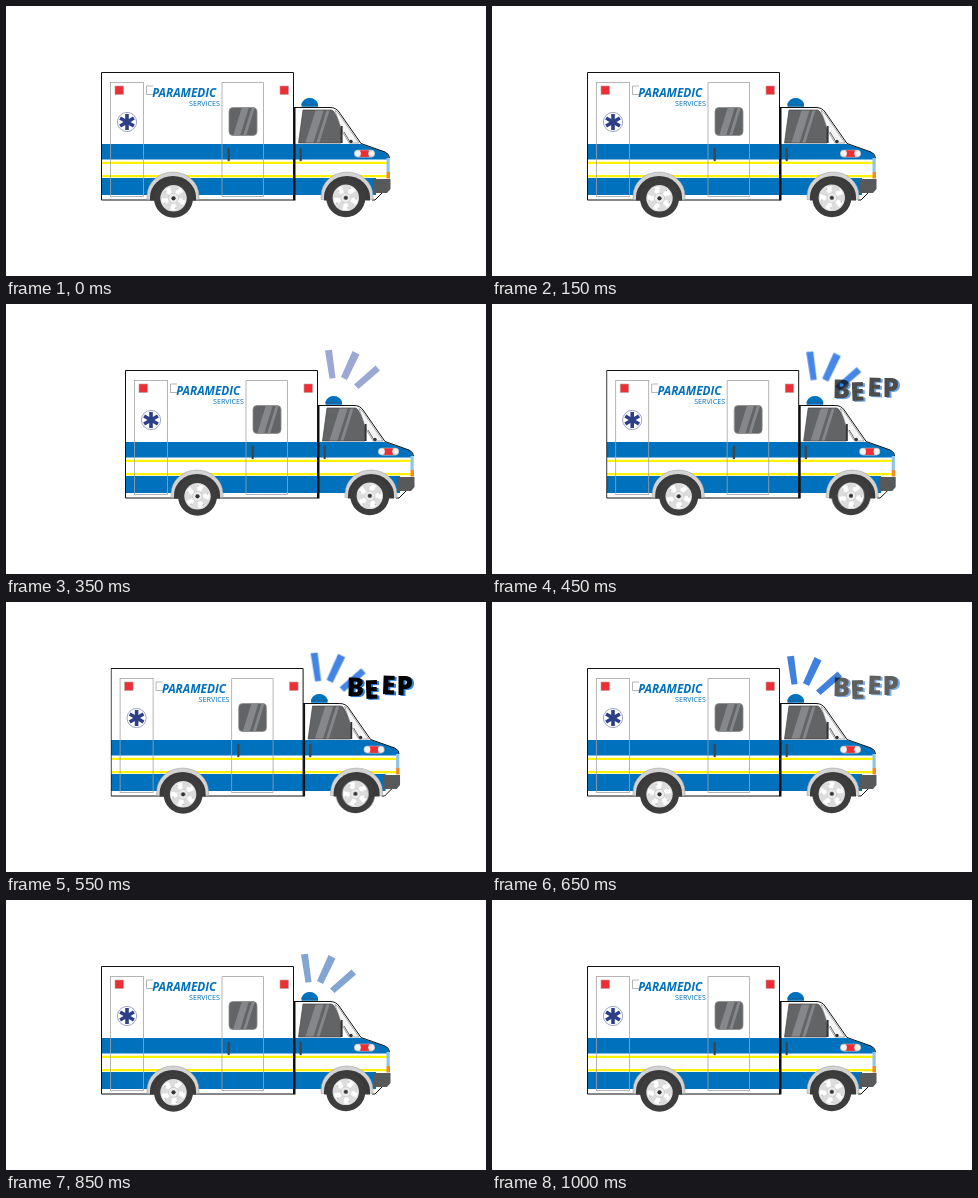
An HTML page that plays this animation: 480x270 px, repeating every 1050 ms.

```html
<!DOCTYPE html>
<html lang="en">
<head>
<meta charset="utf-8">
<title>Ambulance</title>
<style>
  html, body { margin: 0; width: 100%; height: 100%; overflow: hidden; background: #fff; }
  svg { display: block; width: 100%; height: 100%; }
  text { font-family: "Open Sans", sans-serif; }
  .blue { fill: #0071bc; }
  .yellow { fill: #fff200; }
  .red { fill: #ed2f35; }
  .line { fill: none; stroke: #a3a3a3; stroke-width: .8; }
  .ink { fill: none; stroke: #111; stroke-width: 1; stroke-linejoin: round; }
  .beep { font-size: 26px; font-weight: 800; }

  .van, .beams, .beep-group, .rim { animation: 1050ms linear infinite; }
  .van { animation-name: drive; }
  .beams { animation-name: rise, flash; animation-duration: 1050ms, 1050ms; animation-timing-function: linear; }
  .beep-group { animation-name: honk; animation-timing-function: step-end; }
  .rim { animation-name: roll; animation-timing-function: steps(21); }

  /* One step lasts 50 ms: 4.7619% of the loop. */
  @keyframes drive {
    0% { transform: translateX(0); }
    23.809% { transform: translateX(0); animation-timing-function: steps(2); }
    33.333% { transform: translateX(24px); }
    38.095% { transform: translateX(24px); animation-timing-function: steps(5); }
    61.904%, 100% { transform: translateX(0); }
  }
  @keyframes rise {
    0% { transform: translateY(0); }
    23.809% { transform: translateY(0); animation-timing-function: steps(2); }
    33.333% { transform: translateY(-8px); }
    38.095% { transform: translateY(-8px); animation-timing-function: steps(5); }
    61.904%, 100% { transform: translateY(0); }
  }
  @keyframes flash {
    0% { fill: #fff; }
    23.809% { fill: #fff; animation-timing-function: steps(2); }
    33.333% { fill: #9ba8d3; animation-timing-function: steps(2); }
    42.857% { fill: #4586e8; animation-timing-function: steps(5); }
    66.666% { fill: #3f80dd; animation-timing-function: steps(3); }
    80.952% { fill: #82a5d2; animation-timing-function: steps(2); }
    90.476%, 100% { fill: #fff; }
  }
  @keyframes honk {
    0% { opacity: 0; }
    38.095% { opacity: .35; }
    42.857% { opacity: .7; }
    47.619% { opacity: 1; }
    61.904% { opacity: .62; }
    66.666% { opacity: .3; }
    71.428%, 100% { opacity: 0; }
  }
  @keyframes roll { to { transform: rotate(360deg); } }
</style>
</head>
<body>
<svg viewBox="0 0 480 270">
  <defs>
    <g id="arch">
      <path d="M-26 2.5V-1A26 24 0 0 1 26-1V2.5Z" fill="#d3d3d3" stroke="#999" stroke-width=".5"/>
      <path d="M-23 3.5V0A23 21 0 0 1 23 0V3.5Z" fill="#3a3a3a"/>
    </g>
    <g id="wheel">
      <circle r="19.5" fill="#3d3d3d"/>
      <circle r="13.2" fill="#dcdcdc"/>
      <g class="rim">
        <circle r="8.6" fill="none" stroke="#fff" stroke-width="7" stroke-dasharray="5.2 5.607"/>
        <circle r="10.4" fill="none" stroke="#aaa" stroke-width="1.4" stroke-dasharray="1.6 11.469"/>
      </g>
      <circle r="5" fill="#ededed" stroke="#bbb" stroke-width=".6"/>
      <circle r="2.1" fill="#333"/>
    </g>
    <path id="arm" d="M-1.8-8H1.8V8H-1.8Z"/>
    <path id="handle" d="M0 143V154" stroke="#444" stroke-width="2.4" stroke-linecap="round"/>
    <clipPath id="pane"><rect x="223" y="101.5" width="28" height="28" rx="4"/></clipPath>
    <clipPath id="cabPane"><path id="cabGlass" d="M297 104H325Q327 104 328 106L335 119V137H292.5Z"/></clipPath>
  </defs>

  <g class="van">
    <g class="beams" fill="#fff">
      <path d="M295 54.5 302 53.7 305.5 82 299.5 82.7Z"/>
      <path d="M322.5 55 329.5 58.5 317 84 311 81Z"/>
      <path d="M345.5 69.5 350 74.5 328.5 93 324 88.5Z"/>
    </g>

    <!-- box -->
    <rect x="95.5" y="66.5" width="192" height="127.5" fill="#fff"/>
    <!-- cab -->
    <path d="M288 101.5H324Q330 101.5 333 106L355 137.5 379 146Q383.5 148 383.5 152V173L368 194H288Z" fill="#fff"/>
    <path class="blue" d="M95.5 138H355L379 146Q383 148 383 153.5H95.5Z"/>
    <path class="yellow" d="M95.5 155.7H382V157.9H95.5ZM95.5 169H382V171.2H95.5Z"/>
    <path class="blue" d="M95.5 172H370V189H95.5Z"/>
    <path class="ink" d="M288 194H95.5V66.5H287.5V194"/>
    <path class="ink" d="M288 101.5H324Q330 101.5 333 106L355 137.5 379 146Q383.5 148 383.5 152M366 194H369L376 187"/>
    <path d="M288.5 101V194.5" stroke="#111" stroke-width="2"/>

    <!-- rear panel -->
    <rect class="line" x="104.5" y="76.5" width="33" height="114"/>
    <path class="line" d="M147 88.5H140.5V80H147"/>
    <path class="line" d="M216 190.5V76.5H257.5V190.5Z"/>
    <g stroke="#b9a0a0" stroke-width=".6">
      <rect class="red" x="109" y="80" width="8.5" height="8.5"/>
      <rect class="red" x="274" y="80" width="8.5" height="8.5"/>
    </g>
    <g transform="translate(121 116)" fill="#2c3f87">
      <circle r="9.6" fill="#fff" stroke="#8790b4" stroke-width=".8"/>
      <use href="#arm"/>
      <use href="#arm" transform="rotate(60)"/>
      <use href="#arm" transform="rotate(120)"/>
    </g>
    <text class="blue" x="146.3" y="91" font-size="11.8" font-weight="700" font-style="italic">PARAMEDIC</text>
    <text class="blue" x="183" y="99.7" font-size="7.15">SERVICES</text>

    <!-- windows -->
    <g clip-path="url(#pane)">
      <rect x="223" y="101" width="28" height="29" fill="#626466"/>
      <path d="M236 101H243L234 130H227ZM246 101H249L240 130H237Z" fill="#85878a"/>
    </g>
    <rect x="223" y="101.5" width="28" height="28" rx="4" fill="none" stroke="#8e8e8e" stroke-width=".8"/>
    <g clip-path="url(#cabPane)">
      <path d="M290 103H337V138H290Z" fill="#626466"/>
      <path d="M310 103H318L307 138H299ZM321 103H324L313 138H310Z" fill="#85878a"/>
    </g>
    <use href="#cabGlass" fill="none" stroke="#444" stroke-width=".7"/>
    <path d="M329 104.5Q331 105 333 108L353 137H343L336 125Z" fill="#f5f5f5" stroke="#777" stroke-width=".6"/>
    <path d="M335.7 120V137" stroke="#333" stroke-width="1.8"/>
    <path d="M338 126 344 136" stroke="#444" stroke-width=".8"/>
    <circle cx="345" cy="135.5" r="1.7" fill="#333"/>
    <use href="#handle" x="222.7"/>
    <use href="#handle" x="294.7"/>

    <!-- lights and bumper -->
    <rect x="348" y="143.8" width="21" height="7.6" rx="3.8" fill="#b9bcbe"/>
    <rect class="red" x="354.3" y="144.3" width="8.5" height="6.6"/>
    <circle cx="351.8" cy="147.6" r="3" fill="#f2f2f2"/>
    <circle cx="365.3" cy="147.6" r="3" fill="#f2f2f2"/>
    <rect x="380.5" y="152" width="3.2" height="14" fill="#8fc6e8"/>
    <rect x="380.5" y="166" width="3.5" height="6.5" fill="#f28c28"/>
    <path d="M368 173H384.5V183L381 187H368Z" fill="#58595b"/>

    <!-- beacon -->
    <path d="M295.5 100.8V97.5Q298 92 303.7 92T312 97.5V100.8Z" fill="#0071bc"/>
    <path d="M295.5 98.5H312" stroke="#2c5d8c" stroke-width=".7"/>

    <use href="#arch" x="167" y="191"/>
    <use href="#arch" x="341" y="191"/>
    <use href="#wheel" x="167.5" y="192.3"/>
    <use href="#wheel" x="339.8" y="191.8"/>
  </g>

  <g class="beep-group">
    <text class="beep" x="342.5 360.5 377 392.5" y="95 98 93 94" rotate="1 -2 2 0" fill="#2d7fd8">BEEP</text>
    <text class="beep" x="340.5 358.5 375 390.5" y="94 97 92 93" rotate="1 -2 2 0">BEEP</text>
  </g>
</svg>
</body>
</html>
```
